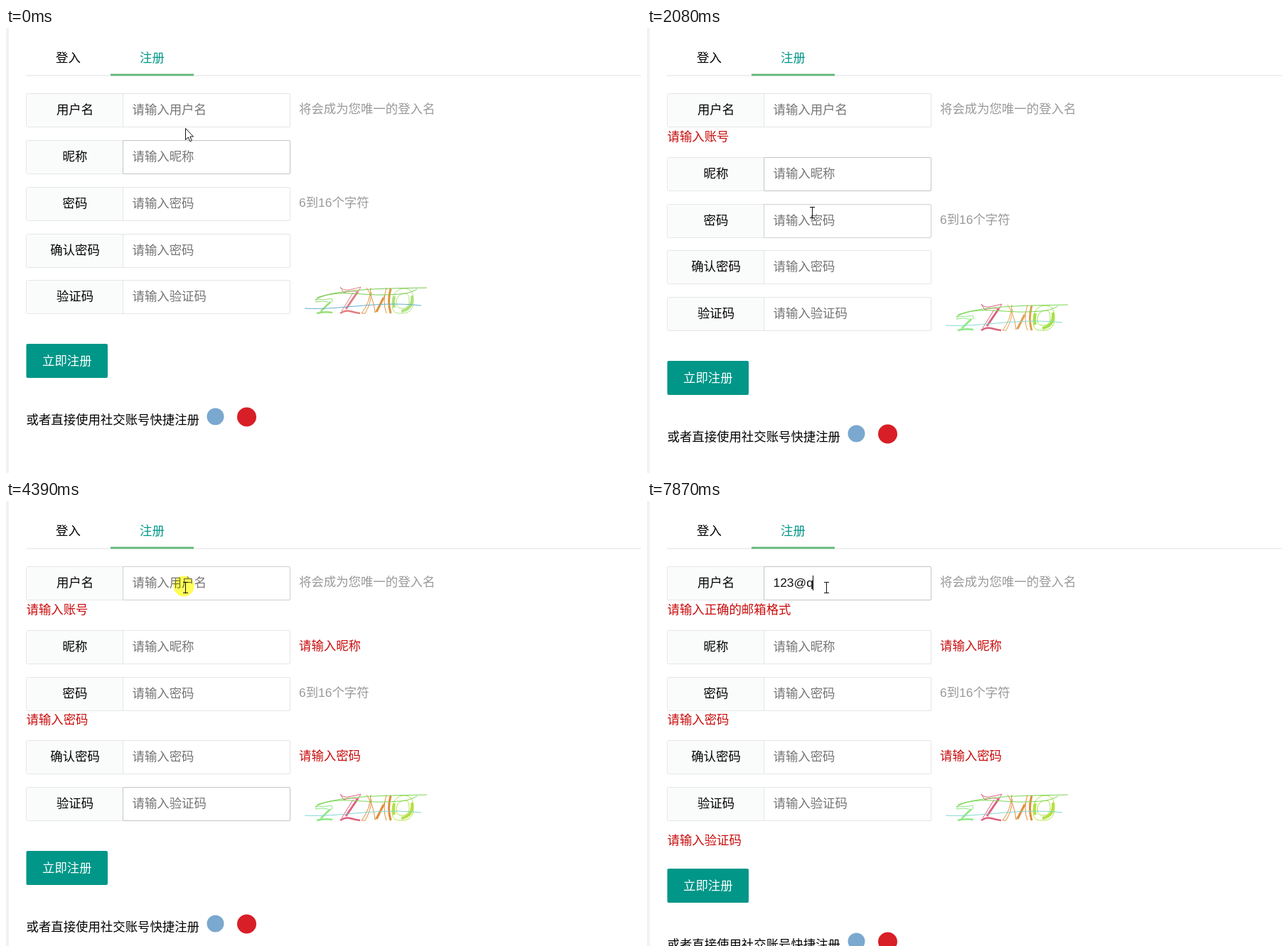
Animation of 893x627 px, one loop 8 s. Source, as an HTML page:

```html
<!DOCTYPE html>
<html lang="zh-CN">
<head>
<meta charset="utf-8">
<title>注册</title>
<style>
html, body { margin: 0; width: 100%; height: 100%; overflow: hidden; background: #fff; }
svg { display: block; }
text { font: 17.4px "Liberation Sans", "Noto Sans CJK SC", "Noto Sans CJK", sans-serif; white-space: pre; }
.label { text-anchor: middle; }
.hint { fill: #999; }
.error { fill: #c90c0c; }
#captcha path { fill: none; }
#glow { mix-blend-mode: multiply; }
</style>
</head>
<body>
<svg width="893" height="627" viewBox="0 0 893 627">
  <rect width="4" height="627" fill="#f2f2f2"/>
  <rect x="28" y="66.5" width="865" height="1" fill="#e2e2e2"/>
  <rect x="147" y="64.6" width="117" height="2.8" fill="#5fb878"/>
  <text x="70" y="47.5">登入</text>
  <text x="188" y="47.5" fill="#009688">注册</text>
  <g id="rows"></g>
  <g id="captcha" stroke-width="1">
    <g class="c0">
      <path d="M436 387v-5q12 2 22-1l1 4-19 16M436 386q9-2 17 0"/>
      <path stroke-width="2.5" d="M456 386L443 399M437 402q11-3 22-1"/>
    </g>
    <g class="c1">
      <path d="M470 365q4 5 11 4t18-4l-4 7q-10-3-20 1zM488 373L472 399"/>
      <path stroke-width="3" d="M495 371L478 396"/>
      <path stroke-width="2.5" d="M470 402q7-5 14-3t14 3"/>
    </g>
    <g class="c2">
      <path d="M513 366q-1 21-13 36h5q8-13 9-30M507 366q10 14 12 35L533 376M535 366q-6 20 0 36"/>
      <path stroke-width="3" d="M531 380L521 400M541 367q-5 18 0 35"/>
    </g>
    <g class="c3">
      <path d="M560 367C549 367 543 376 543 389S549 402 557 402 573 398 573 386 571 367 560 367ZM561 374C553 374 549 380 549 387S553 395 558 395 567 392 567 385 566 374 561 374Z"/>
      <path stroke-width="4" d="M571 377Q573 396 556 399M546 378q-2 9 0 16"/>
    </g>
    <path class="c4" d="M435 383C460 367 500 377 532 376S565 374 578 368"/>
    <path class="c4" d="M437 380C475 367 535 367 592 366"/>
    <path class="c5" d="M420 395C470 398 520 384 584 391"/>
  </g>
  <g id="foot">
    <rect x="28.5" y="445" width="114.5" height="48" rx="2" fill="#009688"/>
    <text x="51" y="475">立即注册</text>
    <text x="28.5" y="557.5">或者直接使用社交账号快捷注册</text>
    <circle cx="294.5" cy="547.5" r="12" fill="#7aa8cf"/>
    <circle cx="338.5" cy="548" r="13.5" fill="#d81e26"/>
  </g>
  <text class="error" id="userError" x="28.5" y="159"></text>
  <text class="error" id="passError" x="28.5" y="314"></text>
  <text class="error" id="codeError" x="28.5" y="483.5">请输入验证码</text>
  <path id="caret" d="M178.5 13v21" stroke="#000"/>
  <circle id="glow" r="14.5" fill="#ffff58"/>
  <path id="arrow" d="M.5 .5V16.5L4.3 13 6.8 18.8 9.3 17.7 6.9 12H11.5Z" fill="#fff" stroke="#111"/>
  <path id="beam" d="M-3.5-8H3.5M-3.5 7H3.5M0-8V7" fill="none" stroke="#111"/>
</svg>
<script>
const $ = id => document.getElementById(id);
const LOOP = 8000, SHIFT = 23.8, FADE = 200;

// label, placeholder, side note, note class, time the note appears
const fields = [
  ['用户名', '请输入用户名', '将会成为您唯一的登入名', 'hint', 0],
  ['昵称', '请输入昵称', '请输入昵称', 'error', 2330],
  ['密码', '请输入密码', '6到16个字符', 'hint', 0],
  ['确认密码', '请输入密码', '请输入密码', 'error', 3660],
  ['验证码', '请输入验证码', '', 'hint', 0]
];
// time a field takes focus, its row
const focuses = [[-1000, 1], [640, 0], [1150, 1], [2300, 2], [3060, 3], [3650, 4], [4540, 0]];
const typing = [[5700, '1'], [5930, '12'], [6340, '123'], [7410, '123'], [7490, '123@'], [7860, '123@q']];
const clicks = [[430, 650], [1090, 1270], [2230, 2390], [2880, 3080], [3590, 3790], [4320, 4560]];
// pointer: time, x, y
const path = [
  [60, 252, 141], [500, 247, 108], [660, 247, 108], [860, 248, 150], [1090, 236, 195],
  [1640, 236, 195], [2080, 232, 260], [2240, 232, 271], [2500, 232, 271], [2880, 235, 346],
  [3340, 235, 346], [3600, 220, 421], [3800, 220, 421], [4110, 250, 162], [4320, 252, 122]
];
const palettes = [
  ['#9adf78', '#e07f83', '#dd9540', '#ace27c', '#78c84c', '#62b0d0'],
  ['#8fe886', '#d9627a', '#e0a050', '#a2e246', '#78d650', '#84dcd2'],
  ['#8fe886', '#e0607f', '#e08c38', '#b4e042', '#78d650', '#84d4d2']
];

const rows = fields.map(([label, hold, note, kind]) => {
  const g = document.createElementNS('http://www.w3.org/2000/svg', 'g');
  g.innerHTML = `<rect x="28.5" y=".5" width="371" height="47" rx="2" fill="#fff" stroke="#e6e6e6"/>
    <path d="M164 1H31q-2 0-2 2V45q0 2 2 2H164z" fill="#fafcfb"/>
    <rect class="box" x="164.5" y=".5" width="235" height="47" rx="1.5" fill="#fff"/>
    <text class="label" x="97" y="29">${label}</text>
    <text class="value" x="177.5" y="29">${hold}</text>
    <text class="${kind} note" x="412" y="28">${note}</text>`;
  $('rows').append(g);
  return { g, box: g.querySelector('.box'), value: g.querySelector('.value'), note: g.querySelector('.note') };
});
$('passError').textContent = fields[2][1];
$('foot').querySelector('text').setAttribute('fill', '#fff');

const show = (el, on) => el.setAttribute('visibility', on ? 'visible' : 'hidden');
const move = (el, x, y) => el.setAttribute('transform', `translate(${x} ${y})`);
const last = (list, t) => list.filter(e => e[0] <= t).pop();

function pointer(t) {
  const i = path.findIndex(p => p[0] > t);
  if (i < 0) return path[path.length - 1].slice(1);
  if (!i) return path[0].slice(1);
  const [a, x, y] = path[i - 1], [b, u, v] = path[i];
  let k = (t - a) / (b - a);
  k *= k * (3 - 2 * k);
  return [x + (u - x) * k, y + (v - y) * k];
}

function draw(t) {
  const first = t >= 1270, second = t >= 3090, third = t >= 4590;
  const top = i => Math.round(92.3 + 65.75 * i + SHIFT * ((i > 0 && first) + (i > 2 && second)));
  const [x, y] = pointer(t);
  const [since, active] = last(focuses, t);
  const fading = last(focuses, t - FADE)[1];
  const typed = last(typing, t);
  let over = false;

  rows.forEach((row, i) => {
    const ty = top(i), hover = x > 164 && x < 400 && y >= ty && y <= ty + 48;
    over ||= hover;
    move(row.g, 0, ty);
    row.box.setAttribute('stroke', i === active ? '#c4c4c4' : hover || i === fading ? '#d0d0d0' : '#e6e6e6');
    row.value.setAttribute('fill', typed && !i ? '#111' : '#757575');
    show(row.note, t >= fields[i][4]);
  });

  const user = rows[0].value;
  user.textContent = typed ? typed[1] : fields[0][1];

  const drop = Math.round(SHIFT * (first + second));
  move($('captcha'), 0, drop);
  move($('foot'), 0, drop + 25 * third);
  palettes[first + second].forEach((c, i) =>
    document.querySelectorAll('.c' + i).forEach(el => el.setAttribute('stroke', c)));

  $('userError').textContent = typed ? '请输入正确的邮箱格式' : '请输入账号';
  show($('userError'), first);
  show($('passError'), second);
  show($('codeError'), third);

  const blink = t - (typed ? typed[0] : since);
  show($('caret'), since > 0 && blink % 1000 < 500);
  move($('caret'), typed ? Math.floor(user.getComputedTextLength()) - 1 : 0, top(active));

  show($('glow'), clicks.some(([a, b]) => t >= a && t < b));
  move($('glow'), x - 2, y - 2);
  show($('arrow'), !over);
  show($('beam'), over);
  move($('arrow'), Math.round(x), Math.round(y));
  move($('beam'), Math.round(x) + .5, Math.round(y) + .5);
}

const start = performance.now();
function tick() {
  draw((performance.now() - start) % LOOP);
  requestAnimationFrame(tick);
}
tick();
</script>
</body>
</html>
```
